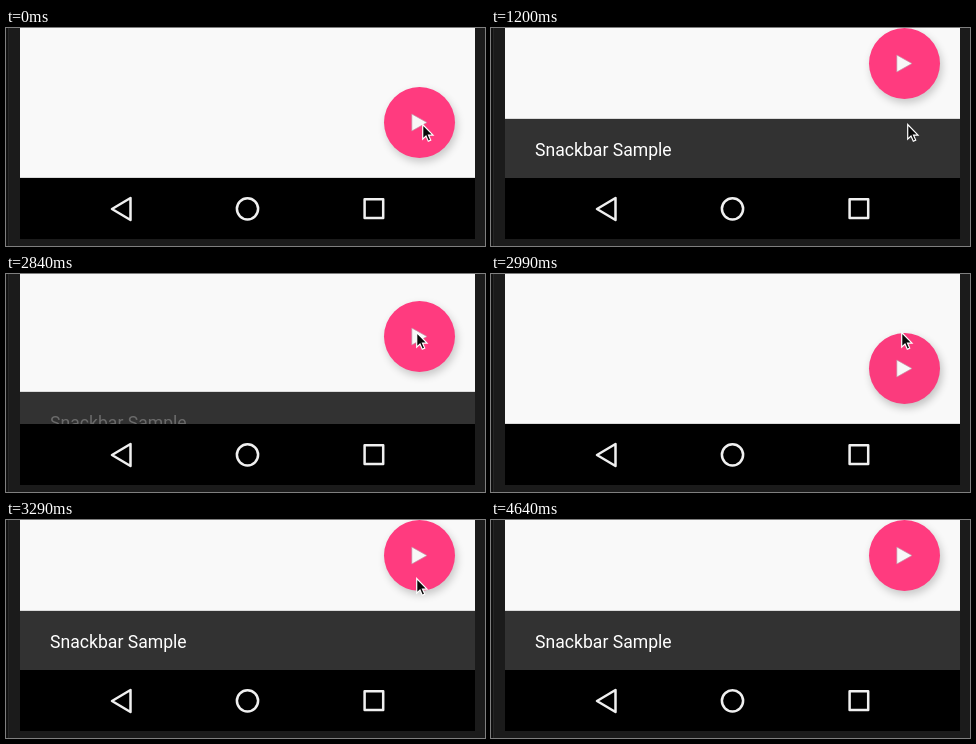
An HTML page that plays this animation: 479 px wide and 218 px high, repeating every 5.41 s.

```html
<!DOCTYPE html>
<html lang="en">
<head>
<meta charset="utf-8">
<title>Snackbar</title>
<style>
  html, body { margin: 0; width: 100%; height: 100%; overflow: hidden; background: #1b1b1b; }
  svg { display: block; width: 479px; height: 218px; }
  text { font: 17.6px Roboto, sans-serif; fill: #fff; }
</style>
</head>
<body>
<svg viewBox="0 0 479 218">
  <defs>
    <clipPath id="screen"><rect x="14" width="455" height="150"/></clipPath>
    <filter id="blur" x="-30%" y="-30%" width="160%" height="160%"><feGaussianBlur stdDeviation="4.2"/></filter>
  </defs>
  <rect width="479" height="218" fill="#1b1b1b"/>
  <rect width="2" height="218" fill="#111"/>
  <rect x="2" width="1" height="218" fill="#262626"/>
  <g clip-path="url(#screen)">
    <rect x="14" width="455" height="150" fill="#f9f9f9"/>
    <g id="fab">
      <circle id="shadow" cx="415.5" cy="98.5" r="35.5" filter="url(#blur)"/>
      <circle id="disc" cx="413.5" cy="94.5" r="35.5"/>
      <path d="M405.8 86V103L421 94.5Z" fill="#f8f8f8" stroke="#c58da2" stroke-width=".7"/>
    </g>
    <g id="bar">
      <rect x="14" y="149" width="455" height="1" opacity=".12"/>
      <rect x="14" y="150" width="455" height="60" fill="#323232"/>
      <text id="label" x="44.1" y="186.5">Snackbar Sample</text>
    </g>
  </g>
  <rect x="14" y="150" width="455" height="61" fill="#000"/>
  <g fill="none" stroke="#f0f0f0" stroke-width="2.5" stroke-linejoin="round">
    <path d="M106 181L124.5 170V192Z"/>
    <circle cx="241.5" cy="180.8" r="10.6"/>
    <rect x="358.6" y="171.2" width="18.6" height="18.8"/>
  </g>
  <path id="cursor" d="M.7 1V15.7L4 12.6 6.3 17.7 8.7 16.6 6.5 11.6H11Z" fill="#0a0a0a" stroke="#fff" stroke-width="1.2"/>
</svg>
<script>
const LOOP = 5410, TICK = 149.6, BAR = 59;
const el = id => document.getElementById(id);
const [fab, shadow, disc, bar, label, cursor] =
  ['fab', 'shadow', 'disc', 'bar', 'label', 'cursor'].map(el);

// cubic-bezier(.4, 0, .2, 1), solved by bisection
function ease(x) {
  let lo = 0, hi = 1, s = .5;
  if (x <= 0) return 0;
  if (x >= 1) return 1;
  for (let i = 0; i < 20; i++) {
    s = (lo + hi) / 2;
    const bx = 1.2 * s * (1 - s) ** 2 + .6 * s * s * (1 - s) + s ** 3;
    if (bx < x) lo = s; else hi = s;
  }
  return s * s * (3 - 2 * s);
}

function draw(time) {
  const t = Math.floor((time + 6) / TICK) * TICK;
  const slide = (start, length) => ease((t - start) / length);
  const tap = at => Math.max(0, 1 - Math.abs(t - at) / 200);

  const open = slide(842, 286) - slide(2759, 250) + slide(3042, 250);
  const alpha = slide(912, 180) - slide(2759, 180) + slide(3112, 180);
  const press = tap(900) + tap(3100);
  const leave = slide(4340, 150);
  const x = 416 - 6 * slide(1432, 500) + 16 * leave;
  const y = 95.5 - 38 * slide(1432, 330) + 92.5 * leave;

  const shift = `translate(0 ${-Math.round(BAR * open)})`;
  fab.setAttribute('transform', shift);
  bar.setAttribute('transform', shift);
  label.setAttribute('opacity', alpha);
  shadow.setAttribute('opacity', .2 + .07 * press);
  disc.setAttribute('fill', `rgb(${255 - 8 * press}, ${59 - press}, ${127 - 4 * press})`);
  cursor.setAttribute('transform', `translate(${x} ${y})`);
  cursor.setAttribute('visibility', t < 4600 ? 'visible' : 'hidden');
}

const start = performance.now();
function tick() {
  draw((performance.now() - start) % LOOP);
  requestAnimationFrame(tick);
}
tick();
</script>
</body>
</html>
```
